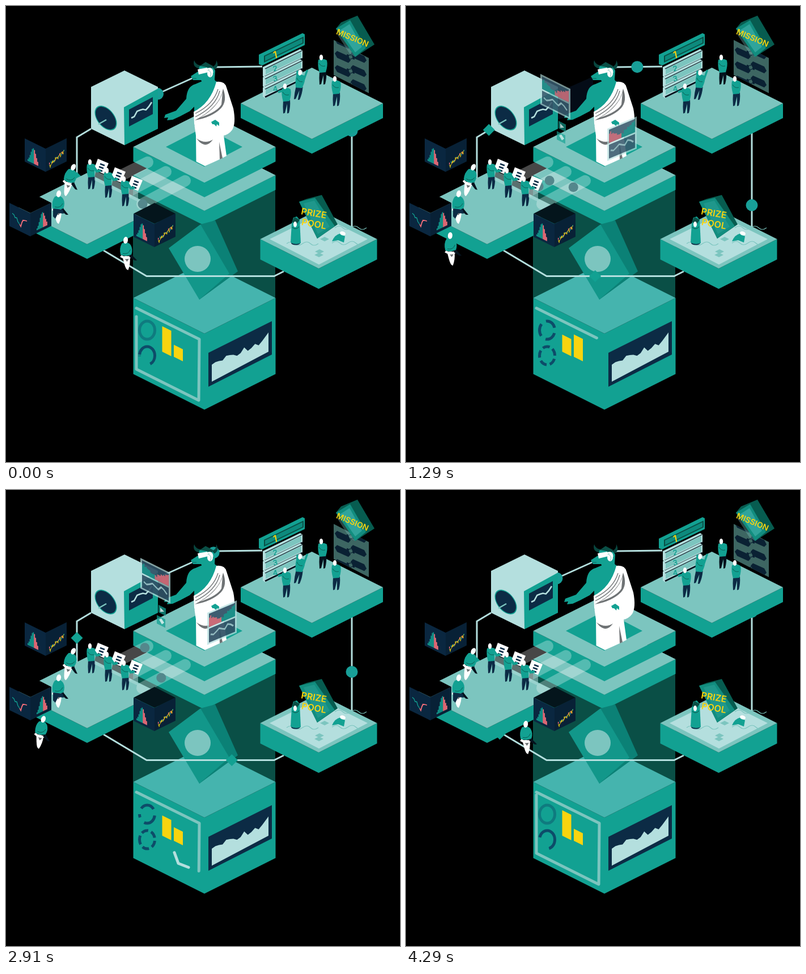
Animation, 695 px wide and 806 px high, one loop 4.32 s. Source, as an HTML page with a canvas:

```html
<!DOCTYPE html>
<html lang="en">
<head>
<meta charset="utf-8">
<title>Isometric market</title>
<style>
html, body { margin: 0; width: 100%; height: 100%; overflow: hidden; background: #000; }
canvas { display: block; }
</style>
</head>
<body>
<canvas width="695" height="806"></canvas>
<script>
const c = document.querySelector('canvas').getContext('2d');
const LOOP = 4320, TAU = 2 * Math.PI;
const teal = '#12a192', light = '#7cc5bf', pale = '#b4dfde', deep = '#0a4f46', navy = '#0c2b45',
  ink = '#04121d', yellow = '#f9d40f', pink = '#f9707b', white = '#fff', grey = '#6f7375';

// Motion rules
const clamp = v => Math.min(1, Math.max(0, v));
const bell = (u, peak) => (.5 + .5 * Math.cos(TAU * (u - peak))) ** 1.5;
const swell = u => Math.sin(Math.PI * u) ** 2;
const smoother = s => s * s * s * (s * (6 * s - 15) + 10);
const noise = i => { const v = Math.sin(i * 12.9898) * 43758.5453; return v - Math.floor(v); };

// Drawing helpers
const fill = (color, d) => { c.fillStyle = color; c.fill(new Path2D(d)); };
const line = (color, width, d) => {
  c.strokeStyle = color;
  c.lineWidth = width;
  c.stroke(new Path2D(d));
};
const oval = (color, x, y, rx, ry = rx, turn = 0) => {
  c.fillStyle = color;
  c.beginPath();
  c.ellipse(x, y, rx, ry, turn, 0, TAU);
  c.fill();
};
const rect = (color, x, y, w, h) => { c.fillStyle = color; c.fillRect(x, y, w, h); };

function within(m, draw) {
  c.save();
  c.transform(...m);
  draw();
  c.restore();
}
const at = (x, y, draw, turn = 0) =>
  within([Math.cos(turn), Math.sin(turn), -Math.sin(turn), Math.cos(turn), x, y], draw);
const face = (x, y, slope, draw) => within([1, slope, 0, 1, x, y], draw);

function label(text, x, y, size, color, turn) {
  at(x, y, () => {
    c.font = `600 ${size}px Inter, sans-serif`;
    c.textAlign = 'center';
    c.textBaseline = 'middle';
    c.fillStyle = color;
    c.fillText(text, 0, 0);
  }, turn);
}

// Jagged run of points between two ends
function zigzag(x, y, u, v, n, amp, seed) {
  let d = '';
  for (let i = 0; i <= n; i++) {
    const k = i / n, jag = i % n ? (noise(i + seed) - .5) * amp : 0;
    d += `${x + (u - x) * k} ${y + (v - y) * k + jag} `;
  }
  return d;
}

function along(pts, k) {
  const legs = [];
  for (let i = 2; i < pts.length; i += 2)
    legs.push(Math.hypot(pts[i] - pts[i - 2], pts[i + 1] - pts[i - 1]));
  let d = k * legs.reduce((a, b) => a + b), i = 0;
  while (i < legs.length - 1 && d > legs[i]) d -= legs[i++];
  const [x, y, u, v] = pts.slice(2 * i, 2 * i + 4), f = d / legs[i];
  return [x + (u - x) * f, y + (v - y) * f];
}

// Tokens set off at the given times and follow a route
function ride(t, draw, route, span, power, ...starts) {
  for (const start of starts) {
    const k = (t - start + LOOP) % LOOP / span;
    if (k < 1) draw(...along(route, k ** power));
  }
}
const gem = (x, y) => fill(teal, `M${x} ${y - 10.5}l10.5 10.5 -10.5 10.5 -10.5 -10.5z`);
const coin = (x, y) => oval('#189f98', x, y, 10.5);
const ball = (x, y) => oval('#54878c', x, y, 8.5);

function slab(x, y, w, h, depth, top = light) {
  fill(teal, `M${x - w} ${y}L${x} ${y + h} ${x + w} ${y}v${depth}L${x} ${y + h + depth} ${x - w} ${y + depth}z`);
  fill(top, `M${x - w} ${y}L${x} ${y - h} ${x + w} ${y} ${x} ${y + h}z`);
}

// People
function man(x, y, legs = navy) {
  at(x, y, () => {
    fill(legs, 'M-5 2 7 2Q8 14 5 25L2 26 2 9-2 25-5 26Q-6 14-5 2z');
    fill(teal, 'M-7-18Q2-21 8-17Q10-8 6 4L-5 5Q-9-8-7-18z');
    oval(white, -2, -22, 3.2, 5);
    line(deep, .8, 'M-6-12Q-2-5 5-7');
  });
}

function holder(x, y) {
  man(x, y);
  at(x + 18, y - 14, () => {
    fill('rgba(180,223,222,.5)', 'M-12 7 5 14V32L-12 24z');
    fill(white, 'M-6-14 13-6 5 13-13 5z');
    line(navy, 2.6, 'M-2-5 6-2M-4 0 4 3M-6 5 2 8');
  });
  line(teal, 4.5, `M${x + 4} ${y - 15}L${x + 10} ${y - 6} ${x + 17} ${y - 7}`);
}

function floater(x, y, turn) {
  at(x, y, () => {
    fill(white, 'M-7 6Q0 3 6 7Q6 20 1 30Q-3 30-5 18z');
    fill(grey, 'M-5 6 5 6Q4 12 0 15z');
    line(white, 4, 'M-10 4Q0 12 10 5');
    fill(ink, 'M7-4 10 4 18 14 14 14 5 7z');
    fill(teal, 'M-6-18Q4-22 9-14Q13-6 9 3Q-2 7-10 2Q-12-10-6-18z');
    oval(white, 1, -23, 4, 6, .2);
    line(deep, .8, 'M-6 0Q4 3 8-6');
  }, turn);
}

// Charts
function histogram(x, base) {
  for (let i = 0; i < 10; i++) {
    const up = 27 * Math.exp(-(((i - 5) / 3.4) ** 2));
    rect(i < 6 ? teal : pink, x + i * 1.9, base - up, 1.7, up);
  }
}

function candles() {
  for (let i = 0; i < 18; i++) {
    const x = 6 + i * 1.5, y = 31 - i * .75 + (noise(i) - .5) * 6;
    rect([pink, yellow, teal][i % 3], x, y, 1.3, 2 + noise(i + 40) * 3);
  }
  line(yellow, .8, 'M' + zigzag(6, 33, 32, 19, 12, 6, 9));
}

function book(x, y, top, left, right) {
  fill(top, `M${x - 37} ${y - 18}l37 -19 37 19 -37 18z`);
  face(x - 37, y - 18, .49, () => { rect('#0a2740', 0, 0, 37, 41); left(); });
  face(x, y, -.49, () => { rect('#082136', 0, 0, 37, 41); right(); });
}

function dip() {
  line(teal, 1.5, 'M5 16l3 1 2 4 3-1 2 6 3 3');
  line(pink, 1.6, 'M18 29l2 3 2-8 2-5 3-1 4-1');
}

// Scenery
function tower() {
  rect(deep, 224, 300, 251, 216);
  slab(350, 516, 125.5, 63, 134.5, '#45b4ae');
  slab(350, 299, 125.5, 63, 26);
  slab(350, 249, 125.5, 63, 26);
  fill(teal, 'M282 249 350 214 417 249 350 284z');
  fill('#0b8176', 'M343 386 369 379 409 469 341 519z');
  fill('#12978a', 'M287 428 343 386 394 473 341 519z');
  oval(light, 338, 447, 23);
  fill(navy, 'M357 613 469 557V616L357 673z');
  fill(pale, `M363 664L${zigzag(363, 634, 452, 592, 14, 11, 3)}L463 577V611z`);
}

function ring(y, u) {
  const w = swell(u), dash = 12 + 50 * w ** 4;
  c.save();
  c.globalAlpha = clamp(.45 + w * 6);
  c.setLineDash(w < .03 ? [] : [dash, dash * .45]);
  c.lineDashOffset = 44 + u * 88;
  line('#0d4c69', 5, `M235.500 ${y}a13 15.500 0 1 1 27 0a13 15.500 0 1 1 -27 0`);
  c.restore();
}

function dashboard(t) {
  const u = t / LOOP, turn = 1757;
  ring(573, u);
  ring(618, u + .5);
  fill(yellow, `M275.500 ${566 + 21 * bell(u, .45)}l16 8V619l-16 -8z`);
  fill(yellow, `M296 ${600 - 21 * bell(u, .37)}l16 8V628l-16 -8z`);

  c.save();
  c.lineCap = c.lineJoin = 'round';
  const len = t < turn ? 448 * (1 - t / turn) : 463 * (t - turn) / (LOOP - turn);
  if (len > 1) {
    c.setLineDash([len, 999]);
    line(light, 5, 'M230 534 341 589 340 697 230 642z');
  }
  const head = 131 - .145 * (t % (LOOP / 2));
  if (head < 62 && head > -40) {
    c.setLineDash([40, 999]);
    c.lineDashOffset = -head;
    line(pale, 5, 'M283 627 293 630 304 660 322 667');
  }
  c.restore();
}

function traffic(t) {
  line(pale, 3, 'M490 469 473 477.500H248L172 432M268 155 330 127 372 108 452 107M610 225V392');
  ride(t, gem, [492, 469, 473, 477.5, 248, 477.5, 150, 422], 2250, 1.25, 110, 2130);
  ride(t, coin, [610, 215, 610, 410], 2000, .85, 1930, 4290);
  ride(t, coin, [255, 161, 330, 127, 372, 108, 470, 107], 2030, 1.7, 1500, 3930);
}

function shade(u) {
  c.globalAlpha = clamp(Math.sin(TAU * u) * 1.5);
  fill('#040c17', 'M268 152 330 125 330 142 318 166 290 196 268 200z');
  c.globalAlpha = 1;
}

function safe(t) {
  fill(pale, 'M150 143 209 114 268 143 268 147 209 246 150 217z');
  fill(teal, 'M208 179 268 146V217L209 246z');
  fill(navy, 'M217 183 259 161V191L217 213z');
  line(pale, 2.6, 'M' + zigzag(221, 198, 257, 170, 7, 12, 5));
  face(176, 198, .5, () => {
    oval(teal, 0, 0, 19.5);
    oval(navy, 0, 0, 18);
  });
  line(pale, 3, 'M125 305V232L150 217');
  line(light, 2.5, 'M163 209 177 201');
  ride(t, gem, [125, 312, 125, 232, 176, 201], 1860, 1, 2240, 4215);
}

function desk(t) {
  slab(143, 358, 125.5, 63, 26);
  c.lineCap = 'round';
  line('rgba(255,255,255,.28)', 20, 'M200 301 250 276M218 327 282 293M240 350 316 309');
  c.lineCap = 'butt';
  ride(t, ball, [196, 304, 250, 276], 1290, 1, 1743);
  ride(t, ball, [228, 322, 282, 293], 1290, 1, 690, 1145);
  ride(t, ball, [241, 350, 316, 309], 1785, 1, 0, 2130);
}

function crew(u) {
  const bell1 = () => histogram(5, 37);
  book(70, 252, '#000', bell1, candles);
  book(43, 366, '#000', dip, () => histogram(11, 36));
  book(262, 385, '#04151c', bell1, candles);
  for (let i = 0; i < 3; i++) holder(150 + i * 30, 298 + i * 15);
  floater(112, 307, .25);
  floater(92, 355, 0);
  fill(navy, 'M83 358 100 360 102 367 92 366 87 376 83 372z');
  const s = smoother(Math.abs(1 - 2 * u));
  floater(16 + 196 * s, 425 + 12 * s, -.15 * Math.sin(TAU * u + .6));
}

function panel(u) {
  const edge = 'M578 60 640 92V154L578 122z';
  fill('#3d6662', edge);
  c.save();
  c.clip(new Path2D(edge));
  for (let i = 0; i < 8; i++) {
    const side = i % 2 ? -1 : 1;
    face(608 - 14 * side, 65 + (i >> 1) * 25 - 10 * swell(u), .45, () => {
      fill('#0a2133', 'M-14 0-10-6 10-6 14 0 10 6-10 6z');
      line('#0a2133', 1, `M${13 * side} ${-2 * side}l${6 * side} ${-4 * side}`);
      oval('#0a2133', 19 * side, -6 * side, 2);
    });
  }
  c.restore();
}

function board() {
  fill(teal, 'M446 86 523 48 527 50V69L452 105 446 103z');
  fill(deep, 'M455 88 525 54V66L455 100z');
  fill('#0d8a7d', 'M457 89 523 57V65L457 97z');
  label('1', 475, 87, 17, yellow, -.2);
  for (let i = 0; i < 3; i++)
    at(453, 108 + i * 18, () => {
      fill(pale, 'M0 0 66-32 70-29V-14L4 19 0 16z');
      fill(light, 'M5 3 68-27V-17L5 13z');
      line(ink, 3, 'M4 17 70-15');
      line(ink, 1.2, 'M4 3 69-29');
      label(i + 2, 22, 3, 13, teal, -.2);
    });
}

function mission(u) {
  slab(539.5, 172, 125.5, 63, 26);
  panel(u);
  fill('rgba(124,197,191,.35)', 'M583 48 636 76 616 90 606 84z');
  fill('#075c50', 'M582 40 591 29 620 17 650 68 616 90z');
  fill('#128d7f', 'M582 40 607 25 635 74 616 90z');
  fill('rgba(69,180,174,.6)', 'M589 43 606 32 628 72 616 82z');
  label('MISSION', 611, 57, 14, yellow, .4);
  board();
  man(558, 113, ink);
  man(582, 151);
  at(517, 140, () => {
    line(teal, 3.5, 'M-5-10-7-25M7-12 10-29');
    man(0, 0);
  }, .16);
  man(494, 164);
  line(teal, 4, 'M487 150 480 152');
}

function pool() {
  slab(551.5, 412, 103, 52, 36);
  fill(pale, 'M465 412 552 369 638 412 552 457z');
  for (const [x, y] of [[495, 420], [575, 419], [580, 392]])
    line(light, 1.2, `M${x} ${y}q8 -6 14 0t14 0 14 0 14 0`);
  for (const [x, y] of [[562, 412], [553, 434], [552, 440]])
    fill(light, `M${x - 8} ${y}l8 -4 8 4 -8 4z`);
  fill('#075c50', 'M517 346 530 341 557 334 585 386 549 411z');
  fill('#128d7f', 'M517 346 545 339 580 389 549 411z');
  fill('rgba(69,180,174,.25)', 'M525 349 544 344 571 390 550 403z');
  oval(navy, 511, 419, 8, 3.5);
  fill(teal, 'M504 384 507 374 513 372 518 378 520 419Q510 423 502 418z');
  fill(deep, 'M504 382 509 373 518 378 513 385z');
  oval(white, 510, 386, 3, 5);
  line(deep, 1, 'M505 391Q511 397 517 390');
  label('PRIZE', 543, 367, 16, yellow, .17);
  label('POOL', 543, 386, 16, yellow, .17);
  fill(teal, 'M575 416Q580 404 590 402L598 407 596 418 586 414z');
  oval(white, 594, 402, 5, 3.5, .3);
}

function bull() {
  fill(teal, 'M334 138Q319 142 318 164L300 185 281 192 279 198 286 197 284 202 294 201 307 195 324 186 332 178V212L362 190 376 136 360 127z');
  fill('#08463f', 'M342 111Q328 108 332 96Q335 105 345 105zM359 108Q371 108 371 96Q378 109 364 114z');
  fill(teal, 'M326 124 340 115 341 107 351 103 363 107 369 114 368 130 372 138 348 138 344 131 330 131z');
  fill(deep, 'M342 106 352 99 365 106 363 111 353 108z');
  line('#0b6a60', 1, 'M328 128 336 128');
  fill(white, 'M338 112 355 109 357 117 340 121z');
  line(white, 3, 'M355 112Q364 108 364 118');
  oval(white, 360, 119, 5, 7);
  line(light, 1, 'M358 114Q364 118 360 125');
  fill(white, 'M371 134Q386 132 389 144L401 181Q406 207 399 219Q393 227 384 229L389 265 377 271 351 283 335.500 275 335 229 332 208 331 187Q361 172 371 134z');
  fill(grey, 'M383 146Q378 178 333 202Q363 197 379 181Q391 168 383 146z');
  fill(white, 'M382 153Q374 179 343 197Q373 187 380 174z');
  line(grey, 1.3, 'M374 147Q366 174 334 190M377 150Q370 178 334 196');
  fill(grey, 'M336 234Q351 245 365 236Q354 252 341 240zM376 240 382 269 377 271z');
  fill(teal, 'M362 205 369 201 376 206 376 212 372 209 371 213 367 209 364 209z');
}

// Depth chart above a price line
function screen(w, h, left, right) {
  const half = h / 2, n = 23, step = (w - 6) / n, tall = half - 5;
  rect(pale, 0, 0, w, h);
  rect(navy, 3, 3, w - 6, tall);
  rect(navy, 3, half + 1, w - 6, half - 4);
  for (let i = 0; i < n; i++) {
    const up = tall * clamp(.25 + Math.abs(i - n * .45) / n * 1.2 + (noise(i) - .5) * .2);
    rect(i < n * .45 ? left : right, 3 + i * step, 3 + tall - up, step + .2, up);
  }
  line(pale, 2.6, 'M' + zigzag(6, half + 12, w - 6, half + 14, 8, 14, 21));
}

function button(x, y, size, icon) {
  face(x, y, .5, () => {
    rect(teal, 0, 0, size, size);
    fill(white, icon);
  });
}

function popups(u) {
  c.globalAlpha = swell(u);
  face(237, 120, .5, () => screen(53, 54, teal, pink));
  face(355, 217, -.42, () => screen(52, 57, pink, teal));
  button(269, 203, 13, 'M3 3 10 7 3 11z');
  button(266, 221, 15, 'M4 6 8 2 13 7 9 12z');
  c.globalAlpha = 1;
}

function frame(now) {
  const t = now % LOOP, u = t / LOOP;
  c.clearRect(0, 0, 695, 806);
  tower();
  dashboard(t);
  traffic(t);
  shade(u);
  safe(t);
  desk(t);
  crew(u);
  mission(u);
  pool();
  bull();
  popups(u);
  requestAnimationFrame(frame);
}
requestAnimationFrame(frame);
</script>
</body>
</html>
```
